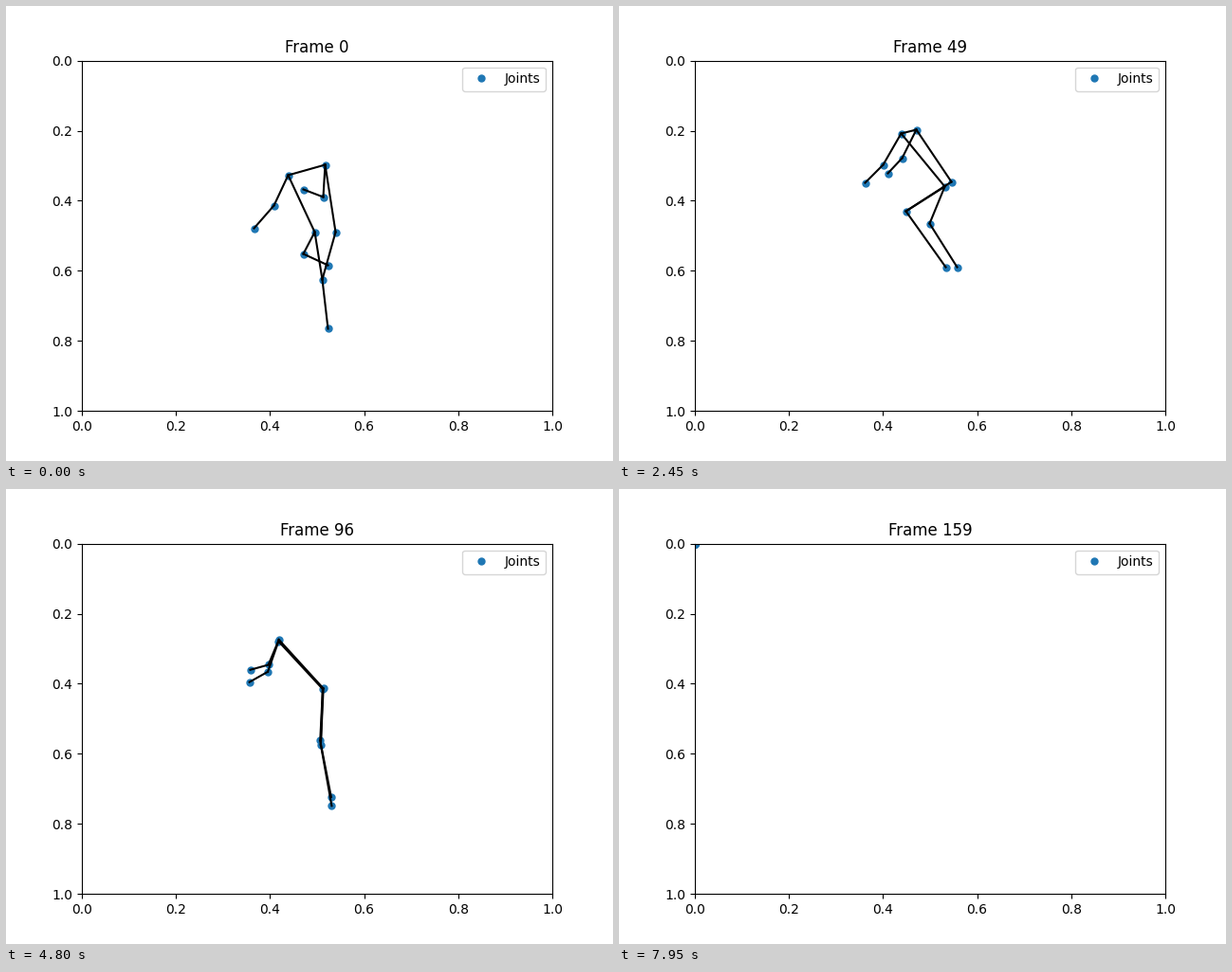
A matplotlib script that plays this animation: 640 by 480 pixels, repeating every 8000 ms.

```python
import numpy as np
import matplotlib.pyplot as plt
from matplotlib.animation import FuncAnimation

FRAMES, INTERVAL = 160, 50


def beside(limb, start, step=(0, 0)):
    """The opposite limb: an offset that grows steadily from joint to joint."""
    return [np.add(p, start) + k * np.array(step) for k, p in enumerate(limb)]


def body(arm, other_arm, leg, other_leg):
    """Twelve joints in axes units from four limbs in stage pixels."""
    pixels = np.array([*arm, *other_arm, *leg, *other_leg], float) + 0.5
    return (pixels - (80, 57.6)) / (496, 369.6)


# Arms run shoulder, elbow, wrist; legs run hip, knee, ankle.
stand = body([(297, 178), (282, 210), (261, 234)], [(336, 167), (334, 201), (313, 193)],
             [(325, 238), (313, 261), (339, 273)], [(347, 238), (333, 288), (339, 340)])
sit = body([(290, 172), (264, 175), (244, 167)], [(334, 170), (350, 202), (353, 228)],
           [(318, 234), (299, 245), (329, 270)], [(342, 229), (319, 230), (343, 271)])

arm = [(297, 134), (278, 167), (259, 186)]
tuck = body(arm, beside(arm, (16, -4), (4, -3)),
            [(343, 190), (327, 229), (356, 275)], [(350, 185), (302, 216), (344, 275)])

arm, leg = [(284, 128), (262, 169), (232, 184)], [(328, 182), (329, 237), (343, 295)]
hang = body(arm, beside(arm, (0.5, 0.5)), leg, beside(leg, (2, 0), (-0.5, 5)))

arm, leg = [(297, 153), (324, 153), (343, 149)], [(353, 190), (337, 242), (340, 307)]
reach = body(arm, beside(arm, (0, -10), (1, -25.5)), leg, beside(leg, (-4, -3), (1.5, 5)))

# Start frame, pose, and how far the body dips on the way to the next pose
KEYS = [(0, stand, 0.02), (29, sit, 0.2), (49, tuck, 0),
        (77, hang, 0.11), (140, reach, 0.11), (FRAMES, hang, 0)]

# Each limb is a chain of three joints; shoulders and hips tie them together.
BONES = [(i, i + 1) for i in range(12) if i % 3 < 2] + [(0, 3), (0, 6), (3, 9), (6, 10)]


def lost(frame):
    """Tracking drops out briefly at a regular beat, then for good."""
    return frame > 150 or frame > 35 and 7 <= frame % 18 < 10


def joints_at(frame):
    if lost(frame):
        return np.zeros((12, 2))
    for (t0, a, dip), (t1, b, _) in zip(KEYS, KEYS[1:]):
        if frame < t1:
            break
    u = (frame - t0) / (t1 - t0)
    ease = u * u * (3 - 2 * u)
    return a + (b - a) * ease + (0, dip * np.sin(np.pi * u) ** 2)


fig, ax = plt.subplots(figsize=(6.4, 4.8), dpi=100)
ax.set_xlim(0, 1)
ax.set_ylim(1, 0)
dots, = ax.plot([], [], "o", markersize=5, label="Joints")
lines = [ax.plot([], [], "k-")[0] for _ in BONES]
title = ax.set_title("Frame 0")
ax.legend(loc="upper right")


def update(frame):
    joints = joints_at(frame)
    dots.set_data(*joints.T)
    for line, bone in zip(lines, BONES):
        line.set_data(*joints[list(bone)].T)
    title.set_text(f"Frame {frame}")
    return [dots, title, *lines]


anim = FuncAnimation(fig, update, frames=FRAMES, interval=INTERVAL,
                     repeat=True, repeat_delay=0, blit=False)
plt.show()
```
